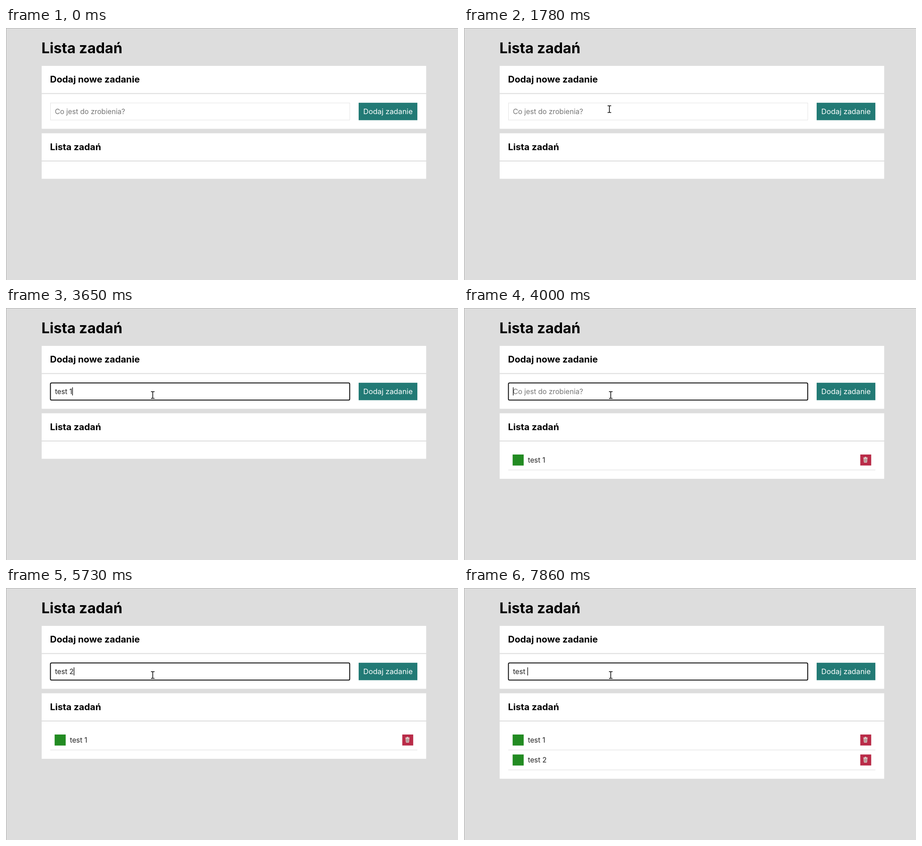
An HTML page that plays this animation: 1001 px wide and 559 px high, repeating every 8000 ms.

```html
<!DOCTYPE html>
<html lang="pl">
<head>
<meta charset="utf-8">
<title>Lista zadań</title>
<style>
  html, body { margin: 0; width: 100%; height: 100%; overflow: hidden; background: #ddd; }
  svg { display: block; width: 1001px; height: 559px; }
  text { font: 15.7px Inter, "Open Sans", sans-serif; font-optical-sizing: none; white-space: pre; fill: #222; }
  .title { font-size: 32.2px; font-weight: 700; fill: #000; }
  .head { font-size: 20.3px; font-weight: 700; fill: #000; }
  .button { font-size: 16.3px; text-anchor: middle; fill: #fff; }
  .hint { fill: #757575; }
</style>
</head>
<body>
<svg viewBox="0 0 1001 559">
  <defs>
    <g id="row">
      <rect x="107.7" y="325" width="24.5" height="24.5" fill="#228b22"/>
      <rect x="877.6" y="325" width="24.2" height="24.4" fill="#b92b48"/>
      <g stroke="#e2d3cf" fill="none">
        <path d="M885.3 333.5 L886.2 342.6 H892 L892.9 333.5 Z" fill="#c9b2ae" stroke-width=".9"/>
        <path d="M884.3 332.5 H893.9 M887.4 331 H890.8" stroke-width="1.4"/>
        <path d="M887.6 335 V341.3 M890.6 335 V341.3" stroke="#8d6468" stroke-width=".8"/>
      </g>
      <rect x="98" y="358.8" width="813" height="1" fill="#ddd"/>
    </g>
  </defs>

  <rect width="1001" height="559" fill="#ddd"/>
  <path d="M0 .5 H1001 M.5 0 V559" stroke="#b0b0b0"/>
  <text class="title" x="78.5" y="56">Lista zadań</text>

  <g fill="#fff">
    <rect x="79" y="84" width="851.5" height="60.4"/>
    <rect x="79" y="146.4" width="851.5" height="77.2"/>
    <rect x="79" y="233.5" width="851.5" height="60.5"/>
    <rect id="list" x="79" y="296" width="851.5" height="38.5"/>
  </g>
  <text class="head" x="97.5" y="121">Dodaj nowe zadanie</text>
  <text class="head" x="97.5" y="270.5">Lista zadań</text>

  <rect x="98.5" y="166.3" width="662.8" height="37.8" fill="#fff" stroke="#e3e3e3"/>
  <rect id="focus" x="98.4" y="166.3" width="662.8" height="37.9" rx="2.5" fill="#fff" stroke="#101010" stroke-width="2"/>
  <text id="hint" class="hint" x="108.2" y="190.5">Co jest do zrobienia?</text>
  <text id="typed" x="108.4" y="190.5"></text>
  <rect id="caret" y="176" width="1.3" height="18" fill="#000"/>

  <rect x="781" y="165.8" width="130" height="38.7" fill="#227a75"/>
  <text class="button" x="846" y="190.5">Dodaj zadanie</text>

  <g id="row1"><use href="#row"/><text x="141.5" y="342.7">test 1</text></g>
  <g id="row2" transform="translate(0 44.3)"><use href="#row"/><text x="141.5" y="342.7">test 2</text></g>

  <path id="arrow" d="M0 0 V16.5 L3.9 12.8 L6.5 18.8 L8.9 17.8 L6.3 11.9 H11.7 Z" fill="#fff" stroke="#000"/>
  <path id="beam" d="M-4 -7.5 H-1 Q0 -7.5 0 -6.5 Q0 -7.5 1 -7.5 H4 M0 -7 V7 M-4 7.5 H-1 Q0 7.5 0 6.5 Q0 7.5 1 7.5 H4" fill="none" stroke="#000" stroke-width="1.5"/>
</svg>
<script>
const LOOP = 8000, STEP = 66, SHOWN = 850, FOCUS = 2038;
const el = id => document.getElementById(id);
const show = (id, on) => { el(id).style.display = on ? '' : 'none'; };

// time, input text, finished rows, caret visible
const states = [
  [0, '', 0, false], [FOCUS, '', 0, true], [2520, '', 0, false],
  [2650, 't', 0, true], [2780, 'te', 0, true], [2990, 'tes', 0, true],
  [3110, 'test', 0, true], [3380, 'test ', 0, true], [3650, 'test 1', 0, true],
  [4000, '', 1, true], [4200, '', 1, false], [4730, '', 1, true],
  [4800, 't', 1, true], [4860, 'te', 1, true], [5060, 'tes', 1, true],
  [5260, 'test', 1, true], [5530, 'test ', 1, true], [5730, 'test 2', 1, true],
  [6060, '', 2, true], [6260, '', 2, false],
  [6660, 't', 2, true], [6790, 'te', 2, true], [6980, 'tes', 2, true],
  [7450, 'test', 2, true], [7860, 'test ', 2, true]
];

// time, x, y of the pointer
const path = [[850, 745, 457], [1510, 314, 157], [1640, 319, 170], [1774, 322, 180], [1972, 325, 193]];

function pointerAt(time) {
  const t = SHOWN + Math.floor((time - SHOWN) / STEP) * STEP;
  const i = path.findIndex(p => p[0] > t);
  if (i < 0) return path[path.length - 1].slice(1);
  const [t0, x0, y0] = path[i - 1], [t1, x1, y1] = path[i];
  let k = (t - t0) / (t1 - t0);
  if (i === 1) k = k * k * (3 - 2 * k);
  return [x0 + (x1 - x0) * k, y0 + (y1 - y0) * k];
}

function drawPointer(time) {
  const visible = time >= SHOWN;
  const [x, y] = visible ? pointerAt(time) : [0, 0];
  const overInput = x > 98 && x < 762 && y > 166 && y < 205;
  show('arrow', visible && !overInput);
  show('beam', visible && overInput);
  const place = `translate(${x} ${y})`;
  el('arrow').setAttribute('transform', place);
  el('beam').setAttribute('transform', place);
}

function draw(time) {
  const [, text, rows, caret] = states.filter(s => s[0] <= time).pop();
  const typed = el('typed');
  if (typed.textContent !== text) typed.textContent = text;
  show('focus', time >= FOCUS);
  show('hint', !text);
  show('caret', caret);
  el('caret').setAttribute('x', 108.4 + (text ? typed.getComputedTextLength() : 0));
  show('row1', rows > 0);
  show('row2', rows > 1);
  el('list').setAttribute('height', rows ? 38.7 + rows * 44.2 : 38.5);
  drawPointer(time);
}

const start = performance.now();
function tick() {
  draw((performance.now() - start) % LOOP);
  requestAnimationFrame(tick);
}
tick();
</script>
</body>
</html>
```
